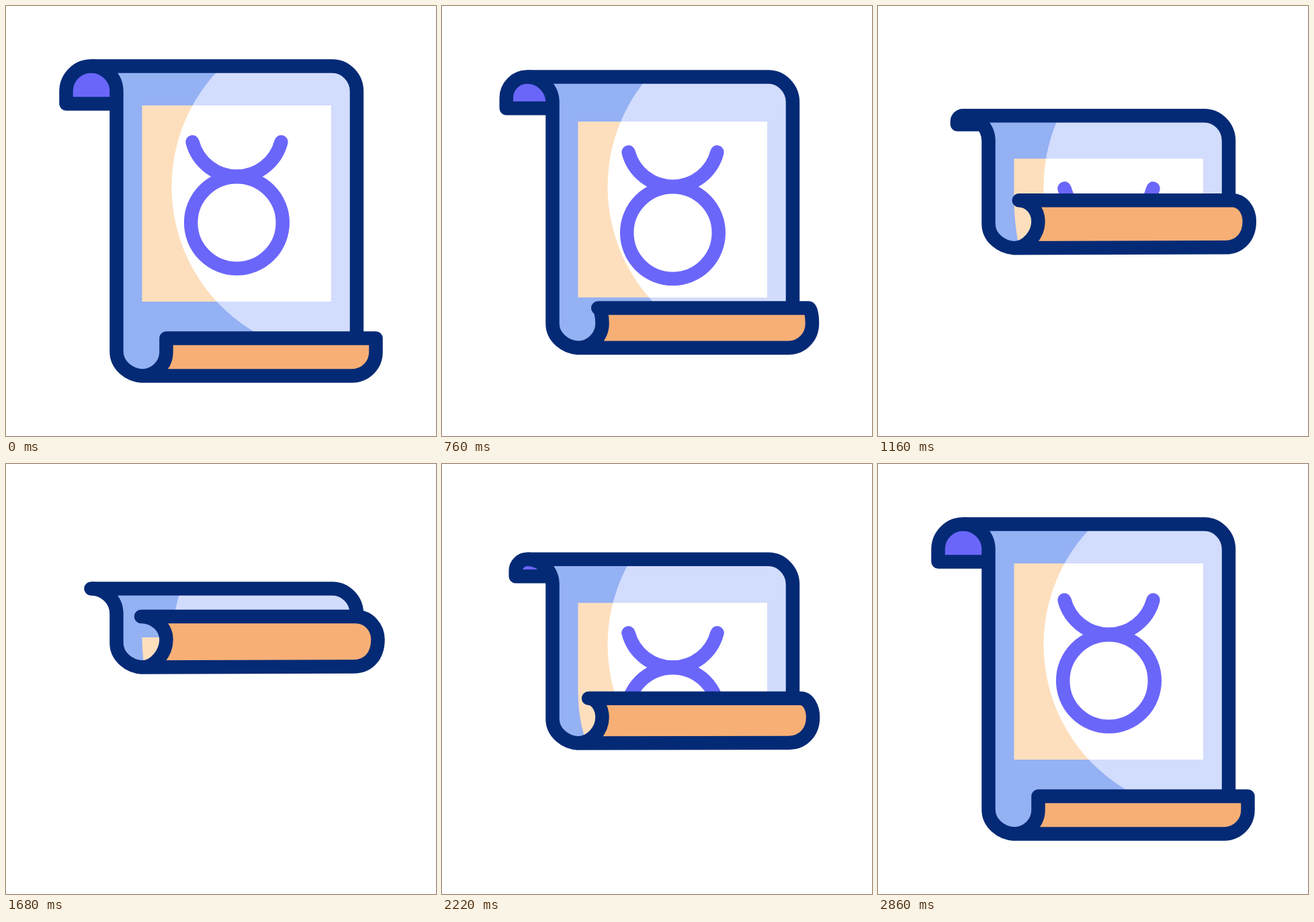
These frames come from a looping animation (640x640 px, 3600 ms). An HTML page with a canvas:

```html
<!DOCTYPE html>
<html lang="en">
<head>
<meta charset="utf-8">
<title>Scroll</title>
<style>
html, body { margin: 0; width: 100%; height: 100%; overflow: hidden; background: #fff; }
canvas { display: block; }
</style>
</head>
<body>
<canvas id="stage" width="640" height="640"></canvas>
<script>
const ctx = document.getElementById('stage').getContext('2d');
const NAVY = '#042a76', ORANGE = '#f7af75', PURPLE = '#6b66fa';
const BLUE = '#94b1f3', LIGHT = '#d2dcfd', CREAM = '#fddfbd';
const LOOP = 3600;

const clamp = v => Math.min(1, Math.max(0, v));
const smooth = v => v * v * (3 - 2 * v);

// cubic-bezier(.48, 0, .52, 1)
function ease(x) {
  let lo = 0, hi = 1;
  for (let i = 0; i < 24; i++) {
    const t = (lo + hi) / 2, u = 1 - t;
    if (1.44 * t * u * u + 1.56 * t * t * u + t * t * t < x) lo = t; else hi = t;
  }
  return smooth(lo);
}

function fill(path, color) {
  ctx.fillStyle = color;
  ctx.fill(path);
}

function stroke(path, color) {
  ctx.strokeStyle = color;
  ctx.stroke(path);
}

function draw(ms) {
  const closing = clamp((ms - 418) / 1140), opening = clamp((ms - 1668) / 1160);
  const p = ease(closing) - ease(opening);      // 0 open, 1 rolled up
  const q = smooth(closing) - smooth(opening);  // softer pace of the inner panel
  const mix = (a, b) => a + (b - a) * p;

  const top = mix(89.5, 185.5), bottom = mix(550.5, 302.5);
  const rollTop = mix(494.5, 227), rollMid = mix(515, 261.5);
  const shoulder = top + 37.5, k = 16.8;

  ctx.fillStyle = '#fff';
  ctx.fillRect(0, 0, 640, 640);
  ctx.lineWidth = 20.5;
  ctx.lineJoin = ctx.lineCap = 'round';

  // Paper with its shaded side, panel and sign
  const leftSide = `M126.5 ${top} C147.5 ${top} 164.5 ${shoulder - 20.5} 164.5 ${shoulder}
    V${bottom - 36} C164.5 ${bottom - 16} 183 ${bottom - 1} 202.5 ${bottom}`;
  const paper = new Path2D(`${leftSide} H522 V${shoulder}
    C522 ${top + k} ${486 + 36 - k} ${top} 486 ${top} Z`);
  const glow = new Path2D();
  glow.arc(497.5, 269, 251, 0, 7);

  const panelTop = 148 + 110 * q, panelEnd = 440 - 29 * q;
  const bendTop = Math.min(panelEnd, Math.max(panelTop, bottom - 75));
  const bend = panelEnd > bottom - 74 ? 2 + 16 * (1 - p) : 0;
  const low = Math.min(panelEnd, bottom - 10);
  const reach = bend * clamp((low - bottom + 75) / 65) ** 2;
  const panel = new Path2D(`M202.5 ${panelTop} H484 V${low} H${202.5 + reach}
    Q202.5 ${(low + bendTop) / 2} 202.5 ${bendTop} Z`);

  ctx.save();
  ctx.clip(paper);
  fill(paper, BLUE);
  fill(glow, LIGHT);
  fill(panel, CREAM);
  ctx.save();
  ctx.clip(glow);
  fill(panel, '#fff');
  ctx.restore();

  const signY = 322.5 + 90 * p;
  const sign = new Path2D(`M277.5 ${signY - 120} A68.2 68.2 0 0 0 409.5 ${signY - 120}`);
  sign.moveTo(411.8, signY);
  sign.arc(343.5, signY, 68.3, 0, Math.PI * 2);
  stroke(sign, PURPLE);
  ctx.restore();

  // Upper curl
  const curlX = mix(89.5, 126.5), open = 1 - p;
  const curlEnd = top + 56 * open, curlMid = top + 37.5 * open;
  const curl = new Path2D(`M164.5 ${curlEnd} H${curlX} V${curlMid}
    C${curlX} ${curlMid - 20.5 * open} ${126.5 - 20.5 * open} ${top} 126.5 ${top}
    C147.5 ${top} 164.5 ${shoulder - 20.5} 164.5 ${shoulder} Z`);
  const curlEdge = new Path2D(`M155 ${curlEnd} H${curlX} V${curlMid}
    C${curlX} ${curlMid - 20.5 * open} ${126.5 - 20.5 * open} ${top} 126.5 ${top}
    H486 C${522 - k} ${top} 522 ${top + k} 522 ${shoulder} V${rollTop}`);
  if (open > 0.02) {
    ctx.save();
    ctx.clip(new Path2D(`M0 0 H640 V${curlEnd} H0 Z`));
    fill(curl, PURPLE);
    ctx.restore();
  }
  ctx.lineCap = 'butt';
  stroke(new Path2D(leftSide), NAVY);
  ctx.lineCap = 'round';
  stroke(curlEdge, NAVY);

  // Lower roll
  const x0 = mix(238.5, 201), x1 = mix(550.5, 520), edge = mix(550.5, 553.5);
  const endX = mix(515, 518), neck = mix(505, 243);
  const roll = new Path2D(`M${x0} ${rollTop}
    C${mix(238.5, 222)} ${rollTop} 238.5 ${neck} 238.5 ${rollMid}
    C238.5 ${rollMid + 19.5} 222 ${bottom} 202.5 ${bottom}
    L${endX} ${bottom - p}
    C${endX + 20} ${bottom - p} ${edge} ${mix(534.5, 287)} ${edge} ${rollMid}
    C${edge} ${neck} ${mix(550.5, 540)} ${rollTop} ${x1} ${rollTop} Z`);
  fill(roll, ORANGE);
  stroke(roll, NAVY);
}

function frame() {
  draw(performance.now() % LOOP);
  requestAnimationFrame(frame);
}
frame();
</script>
</body>
</html>
```
